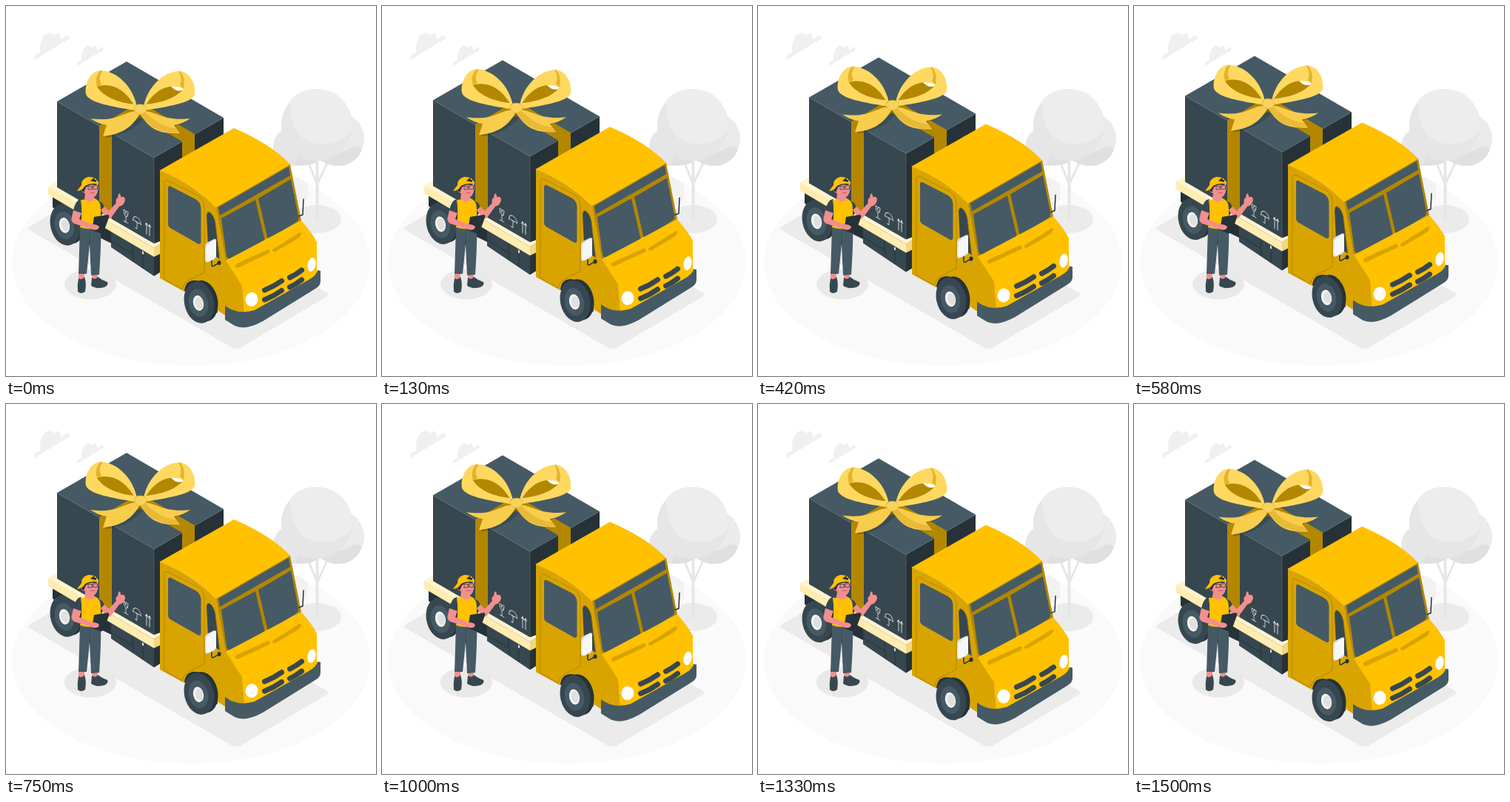
These frames come from a looping animation (500x500 px, 1.54 s). An HTML page with a canvas:

```html
<!DOCTYPE html>
<html lang="en">
<head>
<meta charset="utf-8">
<title>Gift delivery truck</title>
<style>
html, body { margin: 0; width: 100%; height: 100%; overflow: hidden; background: #fff; }
canvas { display: block; width: 500px; height: 500px; }
</style>
</head>
<body>
<canvas id="stage"></canvas>
<script>
const canvas = document.getElementById('stage');
const ctx = canvas.getContext('2d');
const ratio = Math.max(1, window.devicePixelRatio || 1);
canvas.width = canvas.height = 500 * ratio;

const LOOP = 1540, LOW_POINT = -50, LIFT = 10, REST = 0.65;
const SLATE = '#455a64', DARK = '#37474f', BLACK = '#263238';
const YELLOW = '#ffc100', GOLD = '#d9a400', OCHRE = '#b38700', CREAM = '#ffecb0';
const RIBBON = '#ffd85f', SKIN = '#f28f8f';

function fill(color, path) {
  ctx.fillStyle = color;
  ctx.fill(new Path2D(path));
}

function line(color, width, path) {
  ctx.strokeStyle = color;
  ctx.lineWidth = width;
  ctx.stroke(new Path2D(path));
}

function oval(color, x, y, rx, ry, turn = 0) {
  ctx.fillStyle = color;
  ctx.beginPath();
  ctx.ellipse(x, y, rx, ry, turn, 0, Math.PI * 2);
  ctx.fill();
}

function cloud(x, y, scale) {
  ctx.save();
  ctx.translate(x, y);
  ctx.scale(scale, scale);
  fill('#f0f0f0', 'M0 37V32Q2 28 8 27C7 14 12 1 20 0Q25 0 27 5Q29 0 33 1Q37 3 36 10Q41 4 45 4Q49 4 48 8Z');
  ctx.restore();
}

function drawTree() {
  oval('#ebebeb', 420, 288, 33, 19);
  line('#e6e6e6', 4, 'M420.5 289V195');
  line('#e6e6e6', 3, 'M420 240L407 207M421 240L437 205');
  oval('#e6e6e6', 387, 190, 26, 26);
  oval('#ebebeb', 450, 180, 34, 36);
  fill('#e0e0e0', 'M401 190Q426 215 470 190Q481 188 480 196C470 218 444 222 424 208Q408 219 390 215Z');
  oval('#e6e6e6', 420, 161, 48, 48);
  fill('#ededed', 'M384 129C396 108 437 105 456 128Q469 143 467 168Q448 192 415 185Q384 177 384 129Z');
}

function drawGround() {
  oval('#fafafa', 250, 346.5, 242, 139.5);
  cloud(38, 36, 1);
  cloud(96, 53, 0.75);
  drawTree();
  fill('#f2f2f2', 'M366 246L392 231L408 240V262L385 275L366 266Z');
  fill('#ebebeb', 'M32 298L90 264L330 330L433 387Q437 390 433 393L318 461Q312 465 304 461L32 303Q28 300 32 298Z');
  oval('#e9e9e9', 114, 376, 35, 20.5);
}

function wheel(x, y) {
  oval(BLACK, x + 6, y - 2, 19, 28, -0.22);
  oval(DARK, x, y, 20, 28.5, -0.22);
  oval(SLATE, x - 1, y + 1, 13, 19, -0.22);
  oval('#f5f5f5', x - 1, y + 1, 7, 10.5, -0.22);
  oval('#e0e0e0', x, y + 1, 5, 8, -0.22);
}

function drawCargoMarks() {
  ctx.save();
  ctx.transform(1, 0.577, 0, 1, 162, 285);
  line('#e4e7e8', 0.8, 'M-3 -8H3L2.5 -3Q0 2 -2.5 -3ZM0 0V7M-3 7H3M1 -8L-1 -5L1 -3');
  line('#e4e7e8', 0.8, 'M9.5 -1Q10 -8 15 -8Q20 -8 20.5 -1Q18 -3 16.5 -1Q15 -3 13.5 -1Q12 -3 9.5 -1M15 -2V6Q15 9 12.500 7');
  line('#e4e7e8', 0.9, 'M28 7V-8M26.500 -5L28 -8L29.500 -5M32 7V-8M30.500 -5L32 -8L33.500 -5');
  ctx.restore();
}

function drawGift() {
  fill(SLATE, 'M163 75L69 129L200 205L294 151Z');
  fill(DARK, 'M69 129L200 205V329L69 250Z');
  fill(BLACK, 'M200 205L294 151V200L208 326L200 329Z');
  line('#607078', 0.6, 'M69 129L200 205L294 151M200 205V322');
  fill(OCHRE, 'M126 162L172 135L190 145L143 172V294L126 284ZM190 135L255 173V197L238 207V183L172 145Z');
  drawCargoMarks();
}

function drawBow() {
  fill('rgba(38,50,56,.35)', 'M122 156L170 147L196 148L240 156L228 163L234 173Q199 174 187 151Q168 174 134 178L140 163Z');
  fill('#f8cd4c', 'M176 142C158 143 151 157 114 152Q124 159 136 161L131 176C155 174 171 164 181 145C191 162 202 174 235 172L227 161Q239 159 249 152C213 156 204 143 187 142Z');
  fill('#e9ba38', 'M181 146Q193 164 208 168Q222 173 235 172L229 165Q207 163 188 143Z');
  // loops
  fill(OCHRE, 'M122 110Q130 102 147 107Q164 113 173 133Q142 133 122 110ZM240 113Q229 104 216 109Q198 117 189 133Q224 133 240 113Z');
  fill('#fff', 'M222 108Q231 104 240 113Q235 116 228 113Z');
  fill(RIBBON, 'M177 136C172 110 151 88 128 87C112 88 106 108 108 119C112 131 144 136 174 141L175 133C152 131 132 123 123 109C140 103 159 111 172 132Z');
  fill(RIBBON, 'M186 136C191 110 212 88 235 88C251 90 257 109 255 120C251 131 218 136 188 141L188 133C211 131 230 124 240 112C222 104 204 111 190 132Z');
  fill('#e3b32d', 'M128 87Q119 95 123 109L129 106Q124 98 130 88ZM235 88Q243 96 240 112L235 107Q239 97 233 88Z');
  fill('#f9d25c', 'M173 138Q176 132 182 133Q189 133 190 138Q190 145 182 146Q174 146 173 138Z');
  line('#e3b32d', 0.7, 'M173 138Q176 132 182 133Q189 133 190 138Q190 145 182 146Q174 146 173 138Z');
}

function drawBed() {
  fill(BLACK, 'M63 256L145 300V322L100 300L63 272Z');
  wheel(80, 295.5);
  fill(DARK, 'M142 300L200 335V365L142 326Z');
  fill(BLACK, 'M200 335L208 331V360L200 365Z');
  line(BLACK, 1, 'M142 318L171 335V314M172 335V345M185 324V354');
  fill('#e0e0e0', 'M184 331L186 332V336L184 335Z');
  drawGift();
  fill(CREAM, 'M57 244L200 327V339L57 255Z');
  fill('#f2d783', 'M200 327L208 322V335L200 339Z');
  fill('#fff4d0', 'M57 244L69 237V245L200 321L208 318V322L200 327Z');
  drawBow();
}

function drawCabSide() {
  fill(GOLD, 'M208 222Q254 239 284 271L297 343L319 377L322 416L296 418L284 410Q279 376 258 372Q245 371 241 386L208 368Z');
  line(OCHRE, 1, 'M214 239Q214 234 219 236L259 256Q268 262 268 272V360L250 369Q240 373 238 383L214 369Z');
  fill(SLATE, 'M219 246Q219 242 223 244L256 261Q263 265 263.500 273V319Q263 323 259 321L222 300Q219 298 219 295Z');
  fill(DARK, 'M271 282Q272 276 276 279Q281 283 283 292L289 342Q279 337 273 324Z');
  line(OCHRE, 1, 'M271 282Q272 276 276 279Q281 283 283 292L289 342');
}

function drawCabFront() {
  fill(YELLOW, 'M208 222L308 165Q359 187 384 214L284 272Q252 239 208 222Z');
  line('#ffd04a', 0.7, 'M208 222Q252 239 284 272L384 214');
  fill(OCHRE, 'M284 272L384 214L399 290L297 344Z');
  fill(SLATE, 'M287 272L382 217L384 229L289 283Z');
  fill(SLATE, 'M291 287L337 262L350 318L303 341Q299 342 298 337Z');
  fill(SLATE, 'M341 260L385 234L395 284Q396 290 392 292L354 316Z');
  fill(YELLOW, 'M297 344L399 290Q414 307 420 319V361Q419 371 410 376L342 412Q331 418 322 415L319 378Q306 364 297 344Z');
  fill(GOLD, 'M310 352Q309 349 314 347L354 329Q358 329 356 334L315 353Q311 355 310 352ZM360 329L395 307Q400 304 399 308Q398 312 393 315L364 332Q360 333 360 329Z');
  fill(GOLD, 'M319 378L297 344L300 370L322 415Z');
  for (const shift of [0, 13]) {
    line(DARK, 7, `M349.500 ${384 + shift}Q362 ${379 + shift} 372.500 ${371.5 + shift}`);
    line(DARK, 7, `M383.500 ${367 + shift}Q392 ${363 + shift} 399.500 ${357 + shift}`);
  }
  oval('#fff', 332, 396.5, 8.5, 9.5, 0.15);
  oval('#fff', 413, 349.5, 5.5, 9.5, 0.2);
}

function drawCab() {
  drawCabSide();
  drawCabFront();
  fill(BLACK, 'M241 385Q243 369 258 371Q281 376 286 414L278 417Z');
  wheel(261, 400.5);
  fill(SLATE, 'M296 405Q313 418 336 411L409 370Q420 364 421 357L425 358V372Q425 378 418 382L347 426Q323 439 309 432L296 424Z');
  // mirrors
  line(BLACK, 1.5, 'M278 330V350Q278 353 281 351L288 347M396 284L401 282L402 261');
  oval(BLACK, 288, 347, 2.5, 3);
  fill('#e0e0e0', 'M269 325Q269 321 273 319L281 315Q285 314 284 319V338Q284 341 280 343L273 346Q269 347 269 343Z');
  fill('#f7f7f7', 'M271 324L280 317Q284 315 284 319V338L274 345Q270 346 270 341Z');
}

function drawCourier() {
  // legs and shoes
  fill(SKIN, 'M98 360H106V371H98ZM116 361L124 359V371H117Z');
  fill(SLATE, 'M100 299L128 295Q129 318 126 363L115 364L113 322L109 362L98 362Z');
  line(DARK, 0.8, 'M113 305V322');
  fill(DARK, 'M98 368Q103 371 106 366Q109 374 107 386Q101 390 97 386Q96 377 98 368ZM116 367Q121 371 124 366Q129 370 137 373Q139 377 133 380Q122 383 115 378Z');
  // torso
  fill(DARK, 'M101 261Q94 262 91 276L103 281L106 264ZM122 262L130 266L135 275L128 284L122 278Z');
  fill(YELLOW, 'M101 262L120 260Q128 263 128 274V298Q114 304 100 299Q104 281 101 262Z');
  fill(SKIN, 'M107 253H118L120 262Q113 267 106 261Z');
  // raised arm
  fill(SKIN, 'M128 276L133 271L139 277L149 266Q147 262 151 259L152 254Q155 252 155 258Q161 257 161 262Q160 269 153 271L142 286Q139 289 134 284Z');
  // head and cap
  fill(SKIN, 'M104 241L124 238Q126 250 121 257Q114 260 107 253Q101 252 102 246Z');
  fill(BLACK, 'M102 239L124 239L122 242Q112 240 108 245L105 252Q100 249 102 239Z');
  fill(YELLOW, 'M96 250L102 242Q101 234 111 231Q121 230 125 238L125 241Q115 238 107 243Q103 250 96 250Z');
  fill(BLACK, 'M114 236L119 232L120 235L123 235L121 238Z');
  line(BLACK, 0.7, 'M107 244L111 243.5H116V248H111V243.5M118 243H123.5V247.500H118ZM116 245H118');
  line('#b74f50', 0.8, 'M114 252Q117 254 120 252');
  // clipboard arm
  fill(BLACK, 'M119 285L138 282Q140 283 139 286L132 305Q130 308 127 307L116 303Z');
  fill(SKIN, 'M91 276L102 280L99 288L116 295Q125 295 126 299Q124 304 117 302L92 294Q87 291 89 285Z');
}

function render(now) {
  const phase = ((now - LOW_POINT) % LOOP) / LOOP;
  const height = 1 - Math.abs(2 * phase - 1);
  ctx.setTransform(ratio, 0, 0, ratio, 0, 0);
  ctx.fillStyle = '#fff';
  ctx.fillRect(0, 0, 500, 500);
  ctx.lineJoin = ctx.lineCap = 'round';
  drawGround();
  ctx.save();
  ctx.translate(0, REST - LIFT * height);
  drawBed();
  drawCab();
  ctx.restore();
  drawCourier();
}

const start = performance.now();
function tick() {
  render(performance.now() - start);
  requestAnimationFrame(tick);
}
tick();
</script>
</body>
</html>
```
